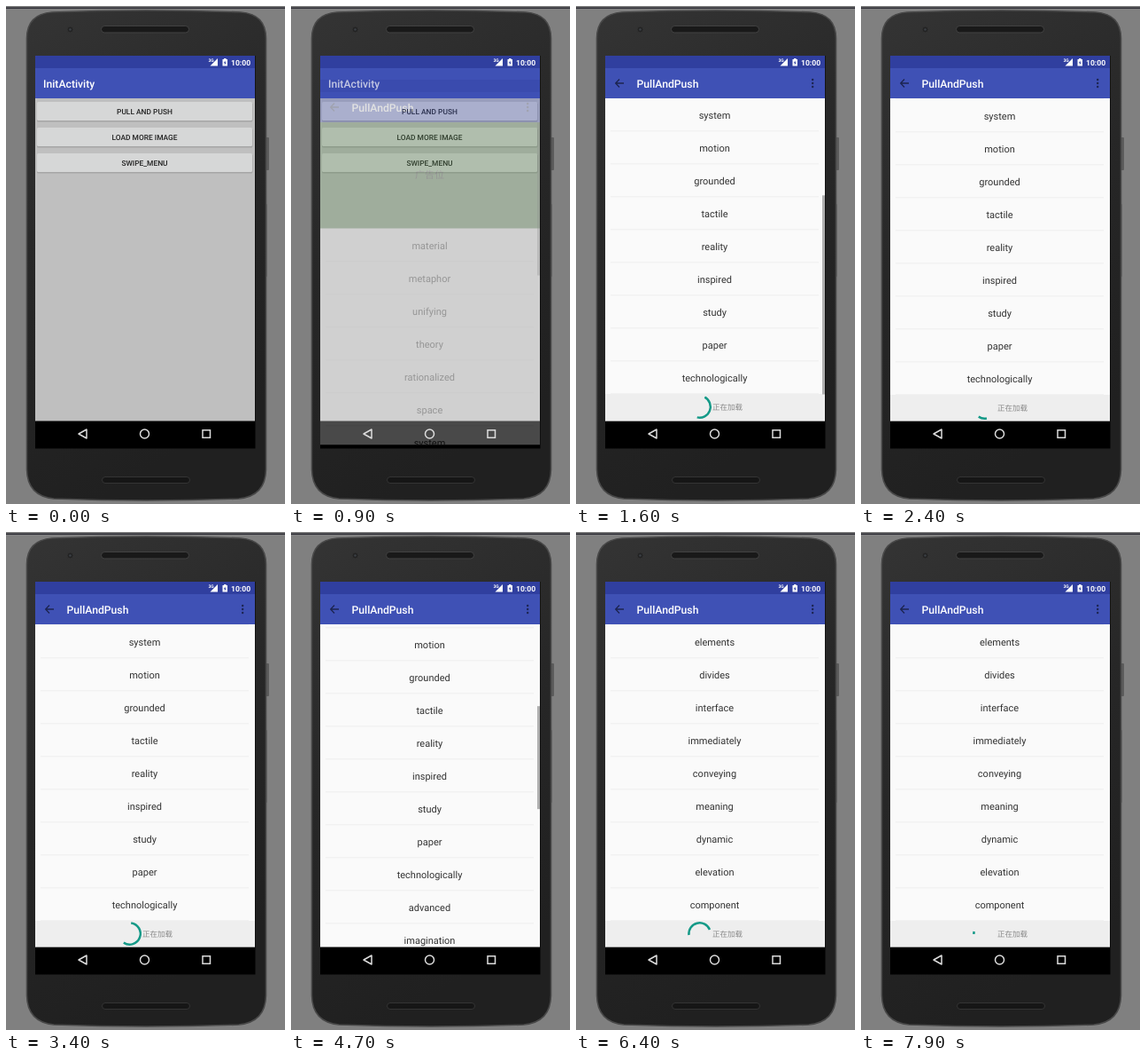
An HTML page for the animation above (8 s loop, 315 px wide and 561 px high).

```html
<!DOCTYPE html>
<html lang="en">
<head>
<meta charset="utf-8">
<title>Pull and push list</title>
<style>
html, body { margin: 0; width: 100%; height: 100%; overflow: hidden; background: #808080; }
svg { display: block; width: 315px; height: 561px; font-family: Roboto, "Noto Sans CJK SC", "Noto Sans CJK", sans-serif; text-rendering: geometricPrecision; }
.title { font-size: 12.2px; font-weight: 500; fill: #fff; }
.button { font-size: 8.4px; font-weight: 500; fill: #222; text-anchor: middle; }
.item { font-size: 11px; fill: #333; text-anchor: middle; }
</style>
</head>
<body>
<svg viewBox="0 0 315 561">
  <defs>
    <linearGradient id="shell" x1="0" y1="0" x2="0.3" y2="1">
      <stop offset="0" stop-color="#343434"/><stop offset="0.5" stop-color="#272727"/><stop offset="1" stop-color="#202020"/>
    </linearGradient>
    <clipPath id="pageClip"><rect x="33" y="56" width="248" height="411.5"/></clipPath>
    <clipPath id="listClip"><rect x="33" y="104" width="248" height="363.5"/></clipPath>
  </defs>

  <rect width="315" height="561" fill="#808080"/>
  <rect y="1.5" width="315" height="1.5" fill="#2c2c34"/>

  <g id="phone">
    <rect x="292" y="148" width="5" height="37" rx="1" fill="#5c5c5c"/>
    <rect x="292" y="223" width="3" height="82" rx="1" fill="#6c6c6c"/>
    <path d="M23.500 36Q24 9 52 7Q158 3 265 7Q293 9 293.500 36V522Q293 552 263 555Q158 559 54 555Q24 552 23.500 522Z" fill="url(#shell)" stroke="#484848" stroke-width="1.600"/>
    <circle cx="72.500" cy="26.500" r="3.500" fill="#232323" stroke="#333"/>
    <circle cx="72.500" cy="26.500" r="1.300" fill="#3c4046"/>
    <rect x="107.500" y="22.500" width="99" height="7.500" rx="3.700" fill="#191919" stroke="#424242"/>
    <rect x="108.500" y="530.500" width="99" height="7" rx="3.500" fill="#161616" stroke="#343434"/>
  </g>

  <g id="home">
    <rect x="33" y="56" width="248.500" height="442.500" fill="#000"/>
    <rect x="33" y="103" width="248" height="364.500" fill="#bfbfbf"/>
    <rect x="33" y="56" width="248" height="14" fill="#303f9f"/>
    <rect x="33" y="70" width="248" height="34" fill="#3f51b5"/>
    <text class="title" x="42" y="91.800">InitActivity</text>
  </g>

  <g id="page" clip-path="url(#pageClip)">
    <rect x="33" y="56" width="248" height="411.500" fill="#fafafa"/>
    <g clip-path="url(#listClip)">
      <g id="list">
        <rect x="33" y="103.500" width="248" height="120" fill="#55854a"/>
        <text class="item" x="156.500" y="167">广告位</text>
      </g>
      <rect id="thumb" x="278" width="3" fill="#000" fill-opacity=".3"/>
    </g>
    <rect x="33" y="56" width="248" height="14" fill="#303f9f"/>
    <rect x="33" y="70" width="248" height="34" fill="#3f51b5"/>
    <path d="M54 87H45M49 82.500L44.700 87L49 91.500" fill="none" stroke="#1c2450" stroke-width="1.300"/>
    <text class="title" x="68.500" y="91.800">PullAndPush</text>
    <g fill="#1c2450"><circle cx="267.200" cy="83" r="1.200"/><circle cx="267.200" cy="87" r="1.200"/><circle cx="267.200" cy="91" r="1.200"/></g>
  </g>

  <g id="system" fill="#fff">
    <text x="228.500" y="63" font-size="5" font-weight="700">3G</text>
    <path d="M239 59V67.500H230.500Z"/>
    <path d="M244.500 60H246V59H248.500V60H250V67.500H244.500Z"/>
    <path d="M247.600 61.500L245.700 64.300H247L246.700 66.500L248.800 63.500H247.400Z" fill="#303f9f"/>
    <text x="254" y="66.800" font-size="8.600" font-weight="700">10:00</text>
    <g fill="none" stroke="#ddd" stroke-width="1.500">
      <path d="M91 477V487L82 482Z" stroke-linejoin="round"/>
      <circle cx="156.500" cy="482" r="5"/>
      <rect x="222" y="477.800" width="8.500" height="8.500"/>
    </g>
  </g>
</svg>
<script>
const LOOP = 8000, STEP = 100;
const ROW = 37, FIRST = 242.5, TOP = 103.5, VIEW = 364;
const words = `material metaphor unifying theory rationalized space system motion grounded tactile
reality inspired study paper technologically advanced imagination magic graphic flexibility print
elements divides interface immediately conveying meaning dynamic elevation component`.split(/\s+/);
const PAGE = 15, APPENDED = 4100;

// [time, value] tables, linear between entries
const scrollSteps = [[1300, 0], [1400, 120], [1500, 325], [1600, 342], [1700, 341], [4600, 341], [4700, 375],
  [4900, 560], [5000, 670], [5100, 750], [5200, 787], [5500, 787], [5600, 800], [5700, 842], [5800, 885], [5900, 898], [6000, 896]];
const slideSteps = [[800, 33], [900, 27], [1000, 8], [1100, 0]];
const fadeSteps = [[700, 0], [800, 0.05], [900, 0.29], [1000, 0.8], [1100, 1]];
const thumbSteps = [[1700, 1], [2000, 0], [4000, 0], [4100, 1], [4200, 1], [4400, 0], [4600, 0], [4700, 1],
  [5300, 1], [5500, 0.1], [5600, 1], [6000, 1], [6300, 0]];

// Loading rings: reference time, start angle there, extra turn per cycle
const spins = [{ at: 1600, angle: 28, turn: 164 }, { at: 6400, angle: 263, turn: 233 }];
const CYCLE = 880, PHASE = 0.2, RADIUS = 12.2;

const $ = id => document.getElementById(id);
function add(parent, tag, attrs, text) {
  const node = document.createElementNS('http://www.w3.org/2000/svg', tag);
  for (const key in attrs) node.setAttribute(key, attrs[key]);
  if (text) node.textContent = text;
  return parent.appendChild(node);
}

function at(steps, t) {
  if (t <= steps[0][0]) return steps[0][1];
  for (let i = 1; i < steps.length; i++) {
    const [t0, a] = steps[i - 1], [t1, b] = steps[i];
    if (t <= t1) return a + (b - a) * (t - t0) / (t1 - t0);
  }
  return steps[steps.length - 1][1];
}

function bezier(x, x1, y1, x2, y2) {
  const cubic = (s, a, b) => 3 * s * (1 - s) ** 2 * a + 3 * s * s * (1 - s) * b + s ** 3;
  let lo = 0, hi = 1;
  for (let i = 0; i < 24; i++) {
    const mid = (lo + hi) / 2;
    if (cubic(mid, x1, x2) < x) lo = mid; else hi = mid;
  }
  return cubic(lo, y1, y2);
}

const buttons = ['PULL AND PUSH', 'LOAD MORE IMAGE', 'SWIPE_MENU'].map((label, i) => {
  const y = 108 + i * 29;
  add($('home'), 'rect', { x: 35, y: y + 1, width: 243.5, height: 21.5, rx: 1.5, fill: '#a6a6a6' });
  const face = add($('home'), 'rect', { x: 35, y, width: 243, height: 21, rx: 1.5, fill: '#d6d7d7' });
  add($('home'), 'text', { class: 'button', x: 156.5, y: y + 13.6 }, label);
  return face;
});

const rows = words.map((word, i) => {
  const y = FIRST + i * ROW, row = add($('list'), 'g', {});
  add(row, 'text', { class: 'item', x: 156.5, y: y + 4.4 }, word);
  add(row, 'rect', { x: 39, y: y + 18, width: 235, height: 0.8, fill: '#ececec' });
  return row;
});

const footer = add($('list'), 'g', {});
add(footer, 'rect', { x: 33, y: 0, width: 248, height: 70, fill: '#eee' });
add(footer, 'text', { x: 154, y: 18.2, 'font-size': 8.5, fill: '#888' }, '正在加载');
const ring = add(footer, 'path', { fill: 'none', stroke: '#159a88', 'stroke-width': 2.5 });

function ringPath(t, spin) {
  const cycles = (t - spin.at) / CYCLE, turns = cycles + PHASE;
  const p = turns - Math.floor(turns);
  const tail = p < 0.5 ? 0 : bezier(p * 2 - 1, 0.4, 0, 0.2, 1);
  const head = p < 0.5 ? bezier(p * 2, 0.4, 0, 0.2, 1) : 1;
  const start = spin.angle + cycles * spin.turn + 360 * (0.75 * tail + 0.25 * (p - PHASE));
  const sweep = Math.max(14, 270 * (head - tail));
  const point = deg => {
    const a = deg * Math.PI / 180;
    return `${139.6 + RADIUS * Math.sin(a)} ${14.5 - RADIUS * Math.cos(a)}`;
  };
  return `M${point(start)}A${RADIUS} ${RADIUS} 0 ${sweep > 180 ? 1 : 0} 1 ${point(start + sweep)}`;
}

function draw(t) {
  const grown = t >= APPENDED, count = grown ? words.length : PAGE, scroll = at(scrollSteps, t);
  buttons[0].setAttribute('fill', t >= 500 && t < 600 ? '#c8c9c9' : '#d6d7d7');

  $('page').setAttribute('transform', `translate(0 ${at(slideSteps, t)})`);
  $('page').setAttribute('opacity', at(fadeSteps, t));
  $('list').setAttribute('transform', `translate(0 ${-scroll})`);
  rows.forEach((row, i) => row.setAttribute('visibility', i < count ? 'inherit' : 'hidden'));
  footer.setAttribute('transform', `translate(0 ${FIRST + (count - 0.5) * ROW})`);
  ring.setAttribute('d', ringPath(t, spins[grown ? 1 : 0]));

  const part = scroll / 341;
  const top = grown ? VIEW * ((scroll - 120) / ROW + 1) / 31 : 109.5 * part;
  $('thumb').setAttribute('y', TOP + top);
  $('thumb').setAttribute('height', grown ? 116 : 173 + 51 * part);
  $('thumb').setAttribute('opacity', at(thumbSteps, t));
}

const began = performance.now();
function tick() {
  const t = (performance.now() - began) % LOOP;
  draw(Math.floor(t / STEP) * STEP);
  requestAnimationFrame(tick);
}
tick();
</script>
</body>
</html>
```
